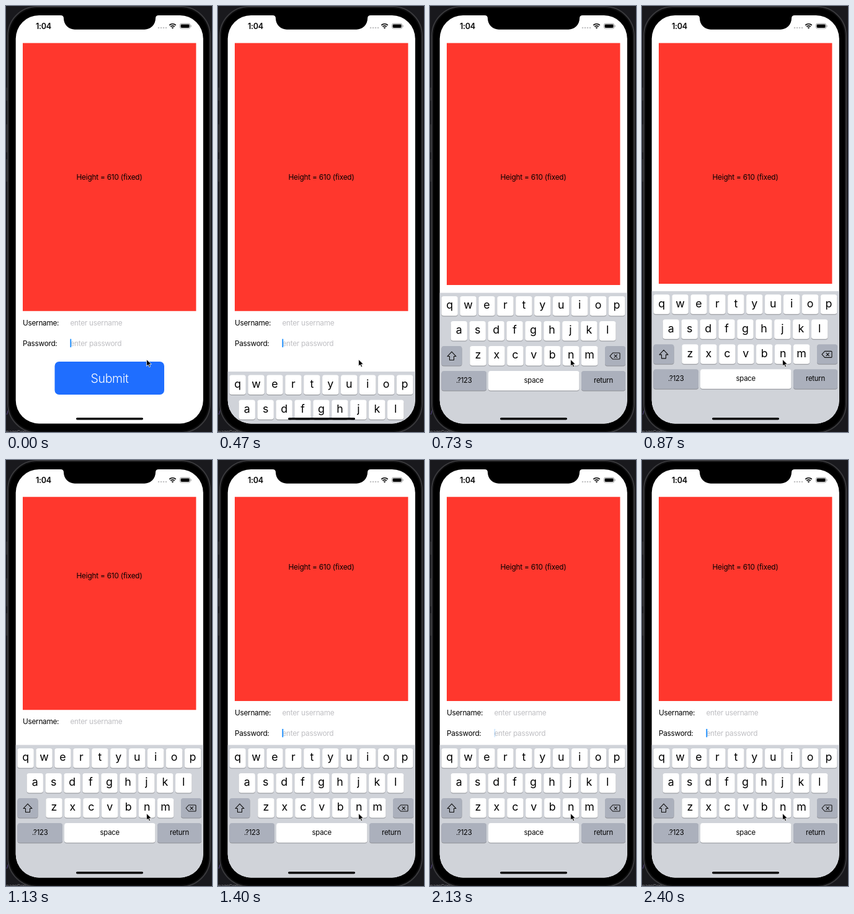
Write an HTML page that moves like this. It is 332 px wide and 684 px high and loops after 2730 ms.

```html
<!DOCTYPE html>
<html lang="en">
<head>
<meta charset="utf-8">
<title>Keyboard avoidance</title>
<style>
html, body { margin: 0; width: 100%; height: 100%; overflow: hidden; background: #19191d; }
svg { display: block; width: 332px; height: 684px; }
text { font-family: Inter, Roboto, sans-serif; font-size: 11.8px; letter-spacing: -.28px; fill: #000; }
.hint { fill: #bfbfc3; }
.height { letter-spacing: -.2px; }
.time { font-size: 12.6px; font-weight: 600; }
.submit { font-size: 19.5px; font-weight: 300; letter-spacing: -.3px; fill: #fff; text-anchor: middle; }
.letter { font-size: 17.8px; letter-spacing: 0; text-anchor: middle; }
.word { font-size: 11.3px; letter-spacing: -.2px; text-anchor: middle; }
.back { font-size: 8px; fill: #77777d; }
.icon { fill: none; stroke: #111; stroke-width: 1.1; stroke-linejoin: round; stroke-linecap: round; }
</style>
</head>
<body>
<svg viewBox="0 0 332 684">
  <defs>
    <clipPath id="screen"><rect x="15.7" y="15" width="302.1" height="655.4" rx="37.5"/></clipPath>
    <clipPath id="view"><rect id="viewRect" x="16" y="59.3" width="302" height="588"/></clipPath>
  </defs>

  <!-- desktop and phone body -->
  <rect width="332" height="684" fill="#19191d"/>
  <path d="M1.500 131V152M1.500 190V235M1.500 246V282" stroke="#2e2e31" stroke-width="2"/>
  <text class="back" x="1" y="655" style="fill:#7a5fc0">/</text>
  <text class="back" x="0" y="687">pageDemo</text>
  <rect x="3" y="1" width="326" height="684" rx="47" fill="#000" stroke="#39393c" stroke-width="2"/>
  <rect x="5" y="3" width="322" height="680" rx="45" fill="none" stroke="#141416"/>

  <g clip-path="url(#screen)">
    <rect x="15" y="15" width="304" height="657" fill="#fff"/>

    <g clip-path="url(#view)">
      <g id="content">
        <text x="113.5" y="278.5" class="height">Height = 610 (fixed)</text>
        <text x="27" y="512.5">Username:</text>
        <text x="103.5" y="512.5" class="hint">enter username</text>
        <text x="27" y="545.5">Password:</text>
        <text x="103.5" y="545.5" class="hint">enter password</text>
        <rect id="caret" x="103.4" y="534.5" width="1.8" height="13.5" rx=".6" fill="#168cff"/>
        <rect x="78.5" y="571" width="176.5" height="53" rx="7" fill="#1f6eff"/>
        <text x="167" y="604.5" class="submit">Submit</text>
      </g>
    </g>

    <g id="keyboard"><rect x="15" width="304" height="230" fill="#d0d3d9"/></g>

    <!-- status bar -->
    <text x="48" y="36.6" class="time">1:04</text>
    <g fill="#c4c4c6">
      <circle cx="246" cy="35" r="1.3"/><circle cx="250" cy="35" r="1.3"/>
      <circle cx="254" cy="35" r="1.3"/><circle cx="258" cy="35" r="1.3"/>
    </g>
    <g fill="none" stroke="#000" stroke-width="1.7">
      <path d="M263.3 30.9a7.4 7.4 0 0 1 10.4 0M265.3 33.2a4.5 4.5 0 0 1 6.4 0"/>
      <path d="M267 34.6h3l-1.5 1.7z" fill="#000" stroke-width=".6"/>
    </g>
    <rect x="280.4" y="28.2" width="16.4" height="8" rx="2.4" fill="none" stroke="#888" stroke-width=".8"/>
    <rect x="281.6" y="29.4" width="14" height="5.6" rx="1.4"/>
    <path d="M298 30.8v2.8" stroke="#888" stroke-width="1"/>
    <rect x="113" y="661" width="108" height="3.6" rx="1.8"/>
  </g>

  <!-- notch -->
  <path d="M88 14V15Q93 15 93 20A17.700 17.700 0 0 0 110.700 37.700H223.300A17.700 17.700 0 0 0 241 20Q241 15 246 15V14Z"/>

  <!-- pointer -->
  <path transform="translate(-.3 .6)" stroke="#fff" stroke-width=".8"
        d="M226.800 566.800V577.700L229.400 575.300L231.100 579.200L233 578.400L231.300 574.600H234.800Z"/>
</svg>

<script>
const $ = id => document.getElementById(id);
const content = $('content'), keyboard = $('keyboard'), caret = $('caret'), viewRect = $('viewRect');

function add(parent, tag, attrs, text) {
  const el = document.createElementNS('http://www.w3.org/2000/svg', tag);
  for (const k in attrs) el.setAttribute(k, attrs[k]);
  if (text) el.textContent = text;
  parent.append(el);
  return el;
}

content.prepend(add(content, 'rect', { x: 27, y: 59.3, width: 279.4, height: 430.5, fill: '#ff372d' }));

// Keyboard, laid out from its own top edge
function key(x, y, width, fill) {
  const box = { x, width, height: 31.5, rx: 3.8 };
  add(keyboard, 'rect', { ...box, y: y + 1, fill: '#8e9095' });
  add(keyboard, 'rect', { ...box, y, fill });
}
const GREY = '#abb0bc', STEP = 29.94, rowY = [5.5, 45.5, 85.5, 125.5];
[['qwertyuiop', 31.6], ['asdfghjkl', 46.7], ['zxcvbnm', 77.5]].forEach(([letters, start], row) => {
  [...letters].forEach((c, i) => {
    const x = start + i * STEP;
    key(x - 13.2, rowY[row], 26.4, '#fff');
    add(keyboard, 'text', { x, y: rowY[row] + 20.3, class: 'letter' }, c);
  });
});
key(18.5, rowY[2], 33, GREY);
key(282, rowY[2], 33, GREY);
add(keyboard, 'path', { class: 'icon', d: 'M35 94.500L42 102H38.500V108H31.500V102H28Z' });
add(keyboard, 'path', { class: 'icon',
  d: 'M290 101.500L294.500 96.500H305Q306 96.500 306 97.500V105.500Q306 106.500 305 106.500H294.500ZM297 99.300L301.500 103.800M301.500 99.300L297 103.800' });
[['.?123', 18.5, 72.5, GREY], ['space', 94, 146.5, '#fff'], ['return', 244, 71, GREY]].forEach(([label, x, w, fill]) => {
  key(x, rowY[3], w, fill);
  add(keyboard, 'text', { x: x + w / 2, y: rowY[3] + 18.8, class: 'word' }, label);
});

// Motion
const LOOP = 2730, TICK = 200 / 3;
const viewBottom = [[330, 647], [400, 625], [467, 566], [533, 515], [600, 474], [667, 454], [733, 448], [800, 446]];
const caretAlpha = [[1667, 1], [1933, 0], [2067, 0], [2400, 1]];

function track(steps, t) {
  if (t <= steps[0][0]) return steps[0][1];
  for (let i = 1; i < steps.length; i++) {
    const [t0, a] = steps[i - 1], [t1, b] = steps[i];
    if (t < t1) return a + (b - a) * (t - t0) / (t1 - t0);
  }
  return steps[steps.length - 1][1];
}

// Critically damped spring, 0 to 1
function spring(ms) {
  const x = Math.max(0, ms) * 0.01826;
  return 1 - (1 + x) * Math.exp(-x);
}

// cubic-bezier(.42, 0, .58, 1)
function easeInOut(p) {
  if (p <= 0) return 0;
  if (p >= 1) return 1;
  let lo = 0, hi = 1;
  for (let i = 0; i < 24; i++) {
    const u = (lo + hi) / 2, v = 1 - u;
    if (3 * v * v * u * .42 + 3 * v * u * u * .58 + u * u * u < p) lo = u; else hi = u;
  }
  return lo * lo * (3 - 2 * lo);
}

function draw(now) {
  // The picture advances at 15 frames per second
  const t = Math.floor((now % LOOP + 4) / TICK) * TICK;
  const top = 670.5 - 213 * spring(t - 392.5);
  const scroll = 102.8 * easeInOut((t - 911) / 300);
  keyboard.setAttribute('transform', `translate(0 ${top})`);
  content.setAttribute('transform', `translate(0 ${-scroll})`);
  viewRect.setAttribute('height', track(viewBottom, t) - 59.3);
  caret.setAttribute('opacity', track(caretAlpha, t));
}

const start = performance.now();
function frame() {
  draw(performance.now() - start);
  requestAnimationFrame(frame);
}
frame();
</script>
</body>
</html>
```
